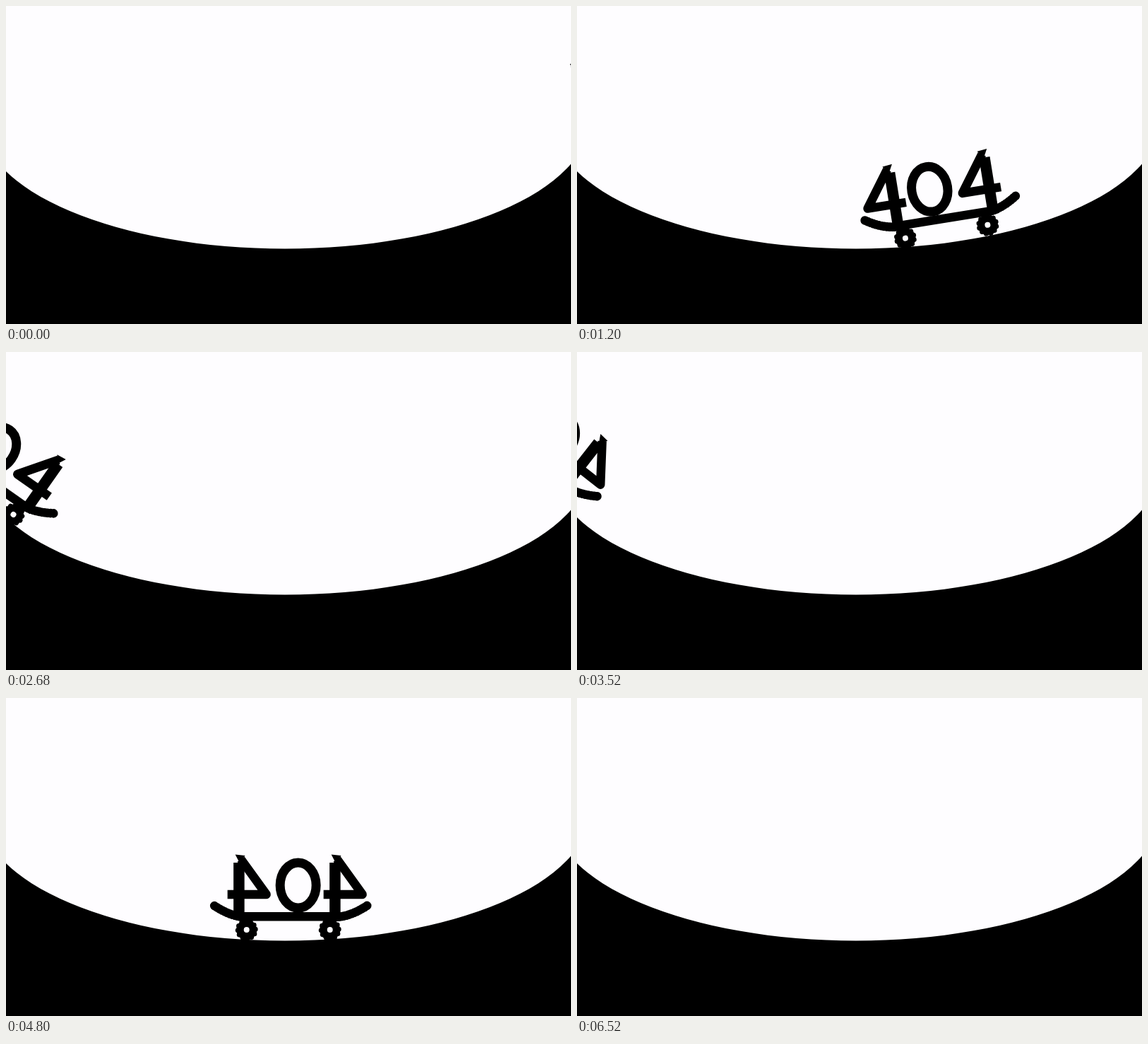
These frames come from a looping animation (800 by 450 pixels, 6680 ms). An HTML page with a canvas:

```html
<!DOCTYPE html>
<html lang="en">
<head>
<meta charset="utf-8">
<title>404</title>
<style>
html, body { margin: 0; width: 100%; height: 100%; overflow: hidden; background: #fefdff; }
canvas { display: block; width: 800px; height: 450px; }
</style>
</head>
<body>
<canvas id="stage" width="800" height="450"></canvas>
<script>
const ctx = document.getElementById('stage').getContext('2d');
const LOOP = 6680, STEP = 40;
const LEFT_END = -122, RIGHT_END = 922, MIDDLE = 398;
const WHITE = '#fefdff', BLACK = '#000';

// Share of the way covered at progress p
const easeOver = p => 0.67 * p + 0.33 * (1 - Math.cos(Math.PI * p)) / 2;
const easeBack = p => p + p * (1 - p) * (-0.287 + 1.303 * p - 0.623 * p * p);
const mix = (a, b, s) => a + (b - a) * s;

// Height and tilt of the board at a given x on the ramp
function pose(x) {
  const d = Math.abs(x - MIDDLE), right = x > MIDDLE;
  const y = 328 - 5.5e-4 * d ** 2 - 7.6e-10 * d ** 4;
  const deg = Math.min(38, 29 * (d / (right ? 326 : 372)) ** 1.2);
  return { y, tilt: (right ? -deg : deg) * Math.PI / 180 };
}

function disc(x, y, r) {
  ctx.beginPath();
  ctx.arc(x, y, r, 0, Math.PI * 2);
  ctx.fill();
}

function four(x) {
  ctx.save();
  ctx.translate(x, 0);
  ctx.lineWidth = 12.5;
  ctx.beginPath();
  ctx.moveTo(-3, -100);
  ctx.lineTo(-39, -50);
  ctx.lineTo(16, -50);
  ctx.stroke();
  ctx.beginPath();
  ctx.moveTo(-9, -105);
  ctx.lineTo(5, -106.5);
  ctx.lineTo(-1, -95);
  ctx.fill();
  ctx.fillRect(-8, -95, 15.5, 81);
  ctx.restore();
}

function zero(x, y) {
  ctx.lineWidth = 13;
  ctx.beginPath();
  ctx.ellipse(x, y, 25.5, 32, 0, 0, Math.PI * 2);
  ctx.stroke();
}

// Deck with upturned ends, built from beads for their rough edge
function board(x) {
  ctx.fillRect(x - 70, -25, 140, 12.5);
  for (let i = 0; i <= 12; i++) {
    const s = i / 12;
    const out = 64 + 44 * s, y = -18 - 16 * s ** 1.8;
    disc(x - out, y, 6.3);
    disc(x + out, y, 6.3);
  }
}

function wheel(x, spin) {
  ctx.fillStyle = BLACK;
  disc(x, 0, 14.5);
  for (let i = 0; i < 12; i++) {
    const a = spin + i * Math.PI / 6;
    disc(x + 12.5 * Math.cos(a), 12.5 * Math.sin(a), 3.5);
  }
  ctx.fillStyle = WHITE;
  disc(x, 0, 4);
}

function rider(x, flip) {
  const { y, tilt } = pose(x);
  ctx.save();
  ctx.translate(x, y);
  ctx.rotate(tilt);
  ctx.scale(flip, 1);
  ctx.fillStyle = ctx.strokeStyle = BLACK;
  ctx.lineJoin = 'round';
  four(-66);
  zero(-14, -63);
  four(70);
  board(-3.5);
  const spin = flip * x / 15;
  wheel(-59, spin);
  wheel(59, spin);
  ctx.restore();
}

function ramp() {
  ctx.fillStyle = BLACK;
  ctx.beginPath();
  ctx.ellipse(395, 161, 431, 182.5, 0, Math.PI, 0, true);
  ctx.lineTo(840, 450);
  ctx.lineTo(-40, 450);
  ctx.closePath();
  ctx.fill();
}

function draw(t) {
  ctx.fillStyle = WHITE;
  ctx.fillRect(0, 0, 800, 450);
  ramp();
  const over = t / 3000, back = (t - 3360) / 3160;
  if (over < 1) rider(mix(RIGHT_END, LEFT_END, easeOver(over)), 1);
  else if (back > 0 && back < 1) rider(mix(LEFT_END, RIGHT_END, easeBack(back)), -1);
}

const start = performance.now();
function tick() {
  const t = (performance.now() - start) % LOOP;
  draw(Math.floor(t / STEP) * STEP);
  requestAnimationFrame(tick);
}
tick();
</script>
</body>
</html>
```
